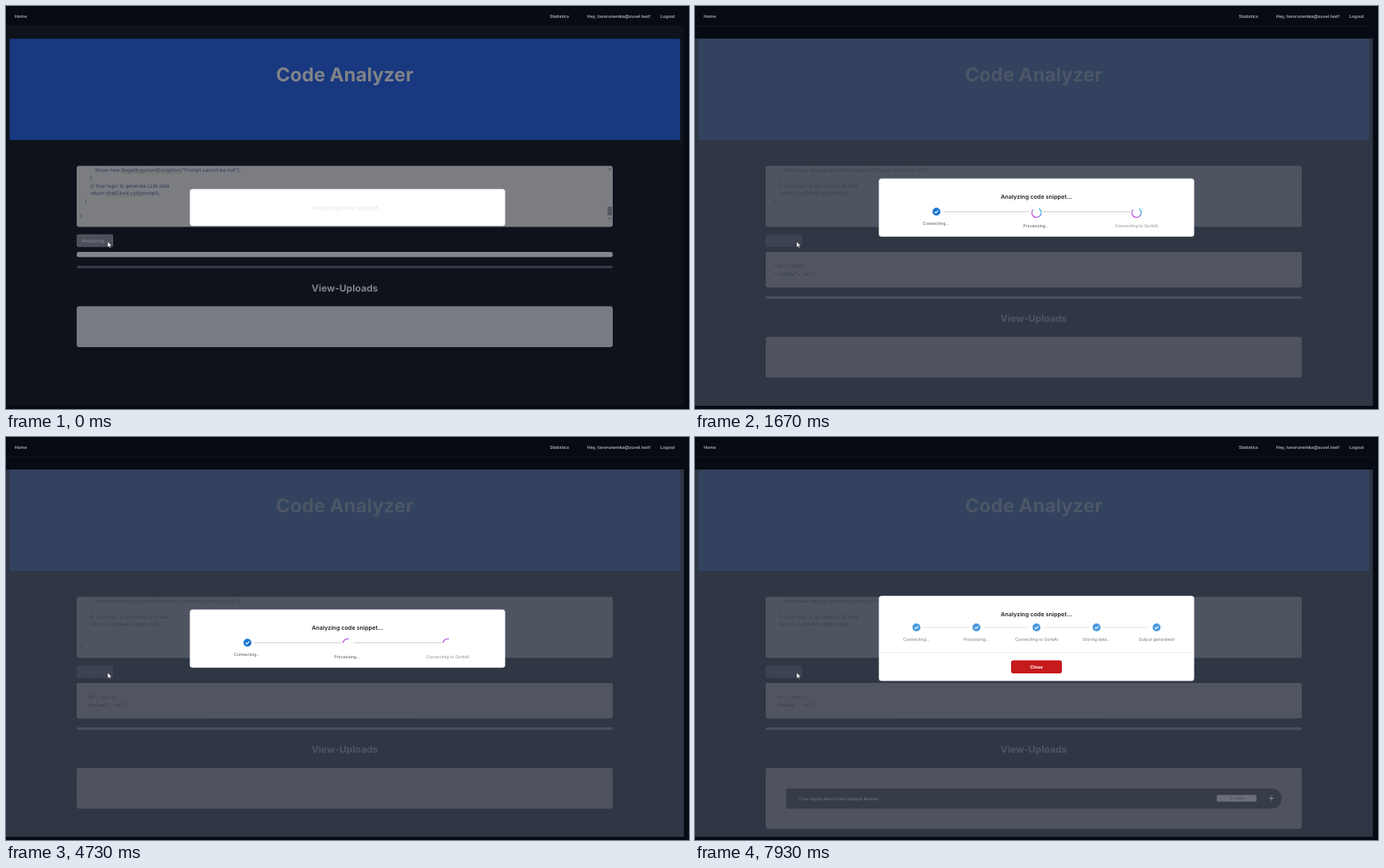
Animation of 860x508 px, one loop 8 s. Source, as an HTML page:

```html
<!DOCTYPE html>
<html lang="en">
<head>
<meta charset="utf-8">
<title>Code Analyzer</title>
<style>
  html, body { margin: 0; width: 100%; height: 100%; overflow: hidden; background: #060b14; }
  svg { display: block; width: 860px; height: 508px; }
  text { font-family: Inter, "Liberation Sans", sans-serif; text-rendering: geometricPrecision; white-space: pre; }
  /* --a: colour before the backdrop, --b: colour under it, --k: progress */
  .mix { fill: color-mix(in srgb, var(--a), var(--b) var(--k)); }
  .bg { --a: #0d121b; --b: #2f3744; }
  .hero { --a: #18387f; --b: #33425f; }
  .title { --a: #808388; --b: #4c5666; font-weight: 700; text-anchor: middle; }
  .area { --a: #7b7d81; --b: #4f5461; }
  .card { --a: #787b83; --b: #4f525f; }
  .code { --a: #2d3850; --b: #3a404d; font-size: 6.2px; }
  .nav { fill: #b4b8be; font-size: 5.4px; font-weight: 600; }
  .mono { font: 6.2px "DejaVu Sans Mono", monospace; fill: #353c49; }
  .label { font-size: 5.3px; text-anchor: middle; fill: #777; }
  .head { font-size: 7.3px; font-weight: 600; text-anchor: middle; fill: #222; }
  .wire { stroke: #c4c4c4; stroke-width: .8; }
  .done .wire { stroke: #dadada; }
  .squiggle { stroke: #67503f; stroke-width: .7; stroke-dasharray: 1 1; }
  .spin { fill: none; stroke: url(#sweep); stroke-width: 3.6; }
</style>
</head>
<body>
<svg viewBox="0 0 860 508">
  <defs>
    <linearGradient id="sweep" x1="0" y1="0" x2="0" y2="1">
      <stop offset="0" stop-color="#c428d6"/>
      <stop offset="1" stop-color="#1cb5e0"/>
    </linearGradient>
    <g id="tick">
      <circle r="5"/>
      <path d="M-2.3 .1L-.7 1.7L2.4-1.5" fill="none" stroke="#fff" stroke-width="1.1"/>
    </g>
  </defs>

  <rect width="860" height="508" fill="#060b14"/>
  <path d="M0 25.5H853" stroke="#111823"/>
  <text class="nav" x="11" y="15">Home</text>
  <text class="nav" x="684.7" y="15">Statistics</text>
  <text class="nav" x="731.7" y="15">Hey, tavorunemka@zuvel.test!</text>
  <text class="nav" x="824" y="15">Logout</text>

  <rect class="mix bg" y="41" width="853.5" height="463"/>
  <rect class="mix bg" y="26" width="853.5" height="15" style="--b:#060b14"/>
  <rect class="mix hero" x="4.5" y="41.3" width="844.3" height="127.7"/>
  <text class="mix title" x="426.5" y="94.5" font-size="24">Code Analyzer</text>

  <rect class="mix area" x="89" y="201.5" width="675" height="77" rx="3"/>
  <g id="code">
    <text class="mix code" x="112.5" y="209.2">throw new IllegalArgumentException("Prompt cannot be null");</text>
    <text class="mix code" x="106" y="218.7">}</text>
    <text class="mix code" x="106" y="228.5">// Your logic to generate LLM data</text>
    <text class="mix code" x="106" y="238.2">return chatClient.call(prompt);</text>
    <text class="mix code" x="99" y="247.7">}</text>
    <text class="mix code" x="93" y="266.7">}</text>
  </g>
  <g id="marks">
    <path class="squiggle" d="M145 210.6H222M125 239.6H172"/>
    <rect x="757.5" y="253" width="5.5" height="11" fill="#55585f"/>
    <path d="M758.7 206.5l1.5-2l1.5 2zM758.7 267l1.5 2l1.5-2z" fill="#3a3f49"/>
  </g>

  <rect class="mix" style="--a:#4b505a;--b:#3c4250" x="89" y="287.7" width="46" height="16" rx="2"/>
  <text class="mix" style="--a:#858b94;--b:#414855" x="95.5" y="297.8" font-size="6">Analyzing...</text>

  <rect id="output" class="mix" style="--a:#83868e;--b:#515562" x="89" y="310" width="675" height="6.5" rx="2.5"/>
  <g id="json">
    <text class="mono" x="99" y="330">"id": null,</text>
    <text class="mono" x="99" y="339.5">"review": null</text>
  </g>
  <g id="lower">
    <rect class="mix" style="--a:#3b3f4c;--b:#4b4f5d" x="89" y="327.4" width="675" height="3.2" rx="1.5"/>
    <text class="mix title" x="426.5" y="359.7" font-size="12">View-Uploads</text>
    <rect id="uploads" class="mix card" x="89" y="378.5" width="675" height="51.5" rx="3"/>
  </g>
  <g id="row">
    <path d="M115 443H726a12.7 12.7 0 0 1 0 25.5H115z" fill="#373c49"/>
    <text x="131" y="457.8" font-size="5.4" font-weight="600" fill="#666b77">Core Application Code Snippet Review</text>
    <rect x="657" y="451.2" width="50" height="8.6" rx="1.5" fill="#6a6e78"/>
    <text x="682" y="457.3" font-size="4.6" text-anchor="middle" fill="#454a56">10 JUNE</text>
    <path d="M722.8 455.5h6M725.8 452.5v6" stroke="#858a94" stroke-width="1"/>
  </g>

  <path d="M128 297v7.2l1.7-1.5l1.1 2.5l1.1-.5l-1.1-2.4h2.3z" fill="#fff" stroke="#111" stroke-width=".4"/>

  <rect id="dialog" x="231.5" width="397" rx="3.5" fill="#fff"/>
  <text id="head" class="head" x="430">Analyzing code snippet...</text>

  <g id="working">
    <path class="wire" d="M312.5 259.5H421.5M438 259.5H548"/>
    <use href="#tick" x="304" y="259.2" fill="#1976d2"/>
    <g transform="translate(430 260.5) scale(.2955)"><circle class="spin" r="20.2"/></g>
    <g transform="translate(556 260.5) scale(.2955)"><circle class="spin" r="20.2"/></g>
    <text class="label" x="303.5" y="276.2" style="fill:#555">Connecting...</text>
    <text class="label" x="429.5" y="279" style="fill:#555">Processing...</text>
    <text class="label" x="556" y="279" style="fill:#8c8c8c">Connecting to GorbAI</text>
  </g>

  <g id="finished" class="done">
    <path d="M231.5 271.5H628.5" stroke="#e6e6e6" stroke-width=".8"/>
    <rect x="398" y="281.5" width="64" height="16.5" rx="3" fill="#c61a1c"/>
    <text x="430" y="291.8" font-size="5.8" font-weight="700" text-anchor="middle" fill="#fff">Close</text>
  </g>
</svg>
<script>
  const LOOP = 8000, SPIN = 1400, SPIN_START = 810;
  const $ = id => document.getElementById(id);
  const clamp = x => Math.min(1, Math.max(0, x));
  const set = (el, attrs) => { for (const k in attrs) el.setAttribute(k, attrs[k]); };
  const show = (id, on) => { $(id).style.display = on ? '' : 'none'; };
  const spinners = document.querySelectorAll('.spin');

  function add(parent, tag, attrs, text = '') {
    const el = document.createElementNS('http://www.w3.org/2000/svg', tag);
    set(el, attrs);
    el.textContent = text;
    parent.append(el);
  }

  ['Connecting...', 'Processing...', 'Connecting to GorbAI', 'Storing data...', 'Output generated!']
    .forEach((name, i) => {
      const x = 278.8 + 75.6 * i, box = $('finished');
      if (i) add(box, 'path', { class: 'wire', d: `M${x - 66} 240H${x - 9.5}` });
      add(box, 'use', { href: '#tick', x, y: 240, fill: '#4798e0' });
      add(box, 'text', { class: 'label', x, y: 257.2 }, name);
    });

  // cubic-bezier(.42, 0, .58, 1)
  function easeInOut(x) {
    let lo = 0, hi = 1, s = x;
    for (let i = 0; i < 20; i++) {
      s = (lo + hi) / 2;
      const v = 3 * (1 - s) * s * (.42 * (1 - s) + .58 * s) + s ** 3;
      if (v < x) lo = s; else hi = s;
    }
    return s * s * (3 - 2 * s);
  }

  function spin(t) {
    const p = (t - SPIN_START) / SPIN % 1;
    const growing = p < .5;
    const e = easeInOut(growing ? 2 * p : 2 * p - 1);
    const attrs = {
      'stroke-dasharray': `${growing ? 1 + 99 * e : 100} 200`,
      'stroke-dashoffset': growing ? -15 * e : -15 - 110 * e,
      transform: `rotate(${360 * p})`
    };
    spinners.forEach(el => set(el, attrs));
  }

  // start time, dialog top, dialog height, heading baseline
  const stages = [
    [0, 230.8, 46.4, 256.6],
    [800, 218.8, 70.6, 244.4],
    [870, 217.5, 73.2, 243.2],
    [7930, 200.3, 107.3, 226.1]
  ];

  function draw(t) {
    const stage = stages.findLastIndex(s => t >= s[0]);
    const [, y, height, base] = stages[stage];
    const k = clamp((t - 10) / 440);
    const fade = k * (2 - k);
    document.documentElement.style.setProperty('--k', fade * 100 + '%');

    set($('dialog'), { y, height });
    set($('head'), { y: base, opacity: .1 + .9 * fade });
    $('marks').style.opacity = 1 - .85 * fade;

    const open = stage >= 2, done = stage === 3;
    set($('output'), { height: open ? 44.7 : 6.5 });
    set($('lower'), { transform: `translate(0 ${open ? 38.6 : 0})` });
    set($('uploads'), { height: done ? 77 : 51.5 });
    show('json', open);
    show('working', stage === 2);
    show('finished', done);
    show('row', done);

    if (stage === 2) {
      const settled = t >= 1070;
      $('working').style.opacity = settled ? 1 : .75;
      spin(settled ? t : 870);
    }
  }

  const start = performance.now();
  function tick() {
    draw((performance.now() - start) % LOOP);
    requestAnimationFrame(tick);
  }
  tick();
</script>
</body>
</html>
```
